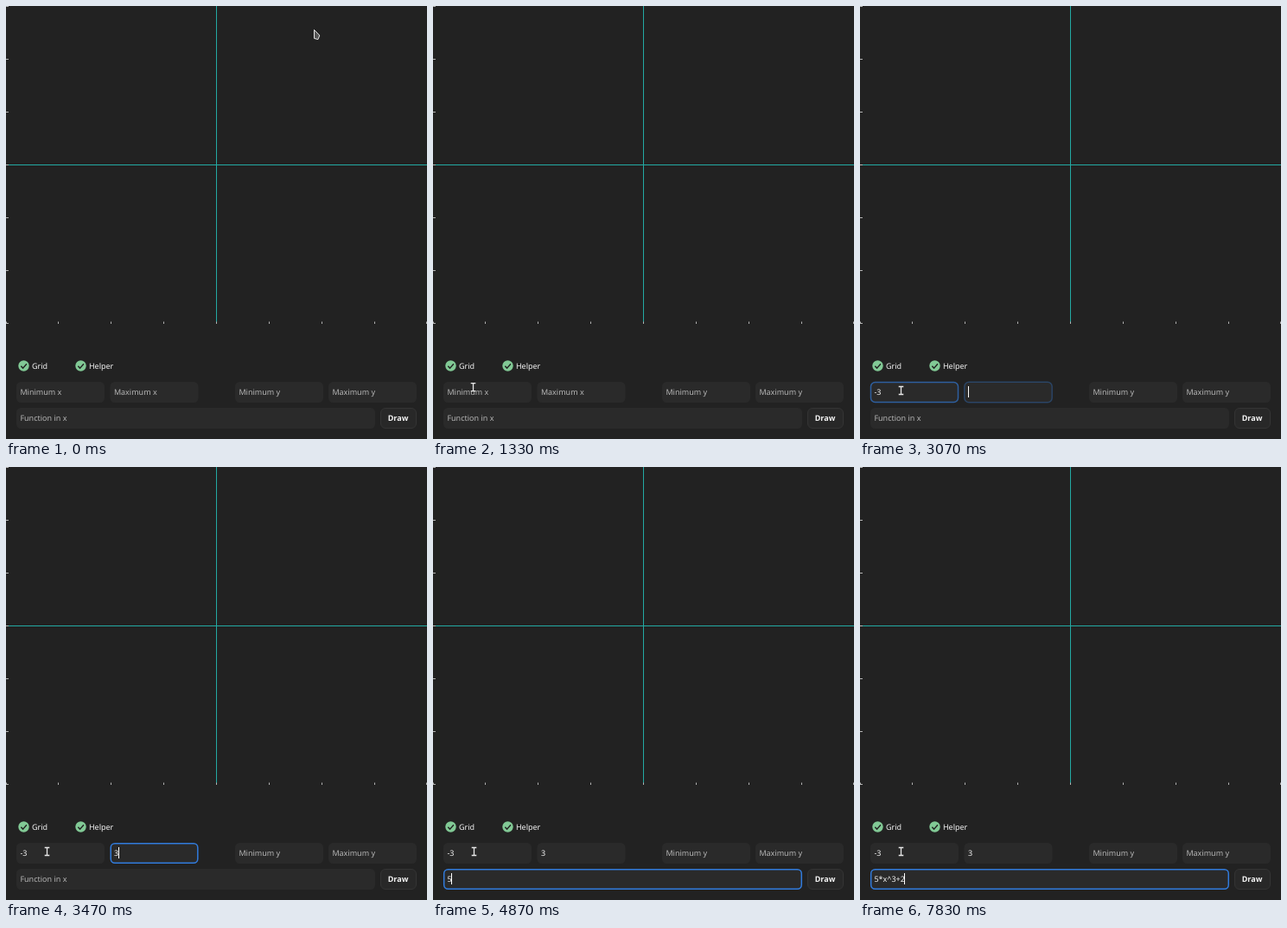
Recreate the animation shown at these times as an HTML page. Size 487x500 px, loop 8 s.

```html
<!DOCTYPE html>
<html lang="en">
<head>
<meta charset="utf-8">
<title>Function plotter</title>
<style>
  html, body { margin: 0; width: 100%; height: 100%; overflow: hidden; background: #222; }
  svg { display: block; width: 487px; height: 500px; }
  text { font: 9px "Noto Sans", sans-serif; fill: #f4f4f4; text-rendering: geometricPrecision; white-space: pre; }
  .hint { fill: #b6b6b6; }
  .bold { font-weight: 700; text-anchor: middle; }
  .ring { fill: none; stroke: #317bdc; stroke-width: 1.5; }
</style>
</head>
<body>
<svg id="stage" viewBox="0 0 487 500"></svg>
<script>
const LOOP = 8000, FADE = 270;
const stage = document.getElementById('stage');

function add(tag, attrs, text) {
  const el = document.createElementNS('http://www.w3.org/2000/svg', tag);
  for (const key in attrs) el.setAttribute(key, attrs[key]);
  if (text) el.textContent = text;
  return stage.appendChild(el);
}
const show = (el, on) => el.setAttribute('visibility', on ? 'visible' : 'hidden');
const clamp = v => Math.max(0, Math.min(1, v));
const easeOut = p => 1 - (1 - p) * (1 - p);
const easeInOut = p => p < .5 ? 2 * p * p : 1 - 2 * (1 - p) * (1 - p);
const mix = (a, b, p) => a + (b - a) * p;

// Plot axes and ticks
add('path', { d: 'M0 183.5H487M243.5 0V367', stroke: '#23aaa4', fill: 'none' });
let ticks = '';
for (let i = 0; i <= 6; i++) ticks += `M0 ${Math.floor(i * 61.1) + .5}h3`;
for (let i = 0; i <= 8; i++) ticks += `M${Math.min(486, Math.floor(i * 60.88)) + .5} 364.5v2.5`;
add('path', { d: ticks, stroke: '#b4b4b4', fill: 'none' });

// Check boxes
for (const [x, label] of [[20.5, 'Grid'], [86.5, 'Helper']]) {
  add('circle', { cx: x, cy: 415.5, r: 6.2, fill: '#81c995' });
  add('path', {
    d: `M${x - 3.2} 415.7l2.3 2.4l4.3 -4.8`, fill: 'none', stroke: '#222', 'stroke-width': 1.4
  });
  add('text', { x: x + 9.4, y: 419 }, label);
}

// Input fields: position, hint, focus span, typed keys
const fields = [
  { x: 12, y: 434, w: 102, hint: 'Minimum x', from: 1530, to: 3030, keys: [[2370, '-'], [2830, '3']] },
  { x: 120.5, y: 434, w: 102, hint: 'Maximum x', from: 3030, to: 3600, keys: [[3330, '3']] },
  { x: 265, y: 434, w: 102, hint: 'Minimum y', from: 3600, to: 3870, keys: [] },
  { x: 373, y: 434, w: 102, hint: 'Maximum y', from: 3870, to: 4290, keys: [] },
  { x: 12, y: 464, w: 415, hint: 'Function in x', from: 4290, to: LOOP + FADE,
    keys: [[4870, '5'], [5370, '*'], [5700, 'x'], [6300, '^'], [6830, '3'], [7330, '+'], [7800, '2']] }
];
for (const f of fields) {
  add('rect', { x: f.x, y: f.y, width: f.w, height: 24, rx: 5.5, fill: '#2a2a2a' });
  f.hintText = add('text', { x: f.x + 4.4, y: f.y + 15.2, class: 'hint' }, f.hint);
  f.value = add('text', { x: f.x + 4.4, y: f.y + 15.2 });
  f.caret = add('rect', { y: f.y + 5, width: 1, height: 13, fill: '#fff' });
  f.ring = add('rect', { class: 'ring' });
}

add('rect', { x: 433.5, y: 464.5, width: 41, height: 23, rx: 5.5, fill: '#282828', stroke: '#343434' });
add('text', { x: 453.5, y: 479.2, class: 'bold' }, 'Draw');

// Mouse pointers, drawn around their hot spots
const arrow = add('path', {
  d: 'M.5 .5L6.8 7L4.9 11.6L.5 10.4Z', fill: '#555', stroke: '#e4e4e4', 'stroke-linejoin': 'round'
});
const beam = add('path', {
  d: 'M-2.8 -4.5H2.8M0 -4.5V4.5M-2.8 4.5H2.8', fill: 'none', stroke: '#e8e8e8', 'stroke-width': 1.3
});

function drawField(f, t) {
  const focused = t >= f.from && t < f.to;
  const glow = focused
    ? easeOut(clamp((t - f.from + 10) / FADE))
    : t >= f.to ? 1 - easeOut(clamp((t - f.to + 10) / FADE)) : 0;
  const typed = f.keys.filter(k => k[0] <= t).map(k => k[1]).join('');
  f.value.textContent = typed;
  show(f.hintText, !focused && !typed);
  show(f.caret, focused);
  const advance = [...typed].reduce((sum, c) => sum + (c === '-' ? 3 : 4.95), 0);
  f.caret.setAttribute('x', Math.floor(f.x + 4.6 + advance));

  const grow = .6 * (1 - glow) - .7;
  f.ring.setAttribute('x', f.x - grow);
  f.ring.setAttribute('y', f.y - grow);
  f.ring.setAttribute('width', f.w + 2 * grow);
  f.ring.setAttribute('height', 24 + 2 * grow);
  f.ring.setAttribute('rx', 5.5 + grow);
  f.ring.setAttribute('opacity', glow);
}

function drawPointer(t) {
  const p = easeInOut(clamp((t - 640) / 690));
  const q = clamp((t - 1330) / 140);
  const x = mix(356, 46.5, p) + q;
  const y = mix(27, 440, p) + 4 * q;
  const overField = y > 434;
  show(arrow, !overField);
  show(beam, overField);
  (overField ? beam : arrow).setAttribute('transform', `translate(${x} ${y})`);
}

const start = performance.now();
function frame() {
  const t = (performance.now() - start) % LOOP;
  for (const f of fields) drawField(f, t);
  drawPointer(t);
  requestAnimationFrame(frame);
}
frame();
</script>
</body>
</html>
```
